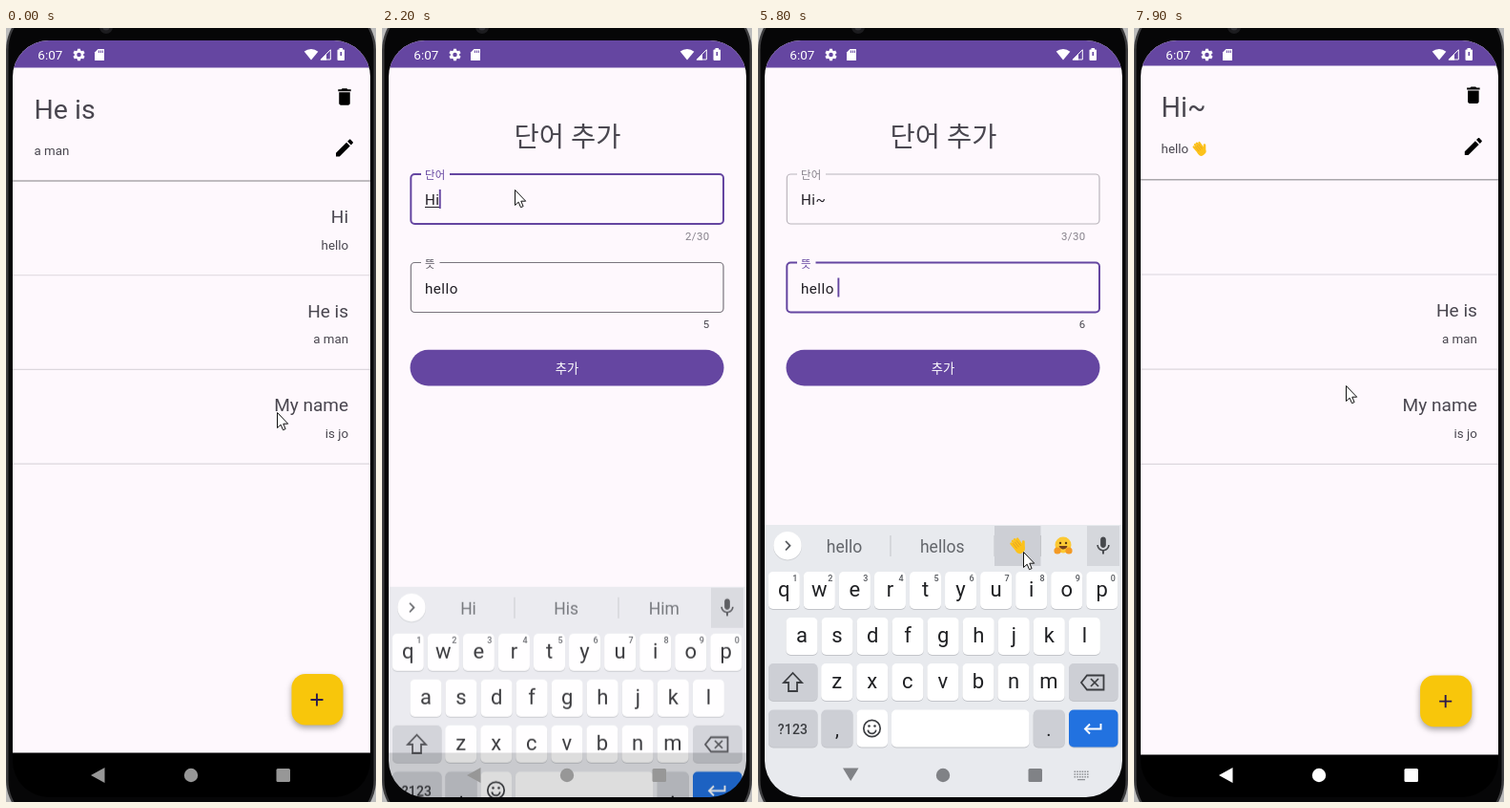
These frames come from a looping animation (388x810 px, 8 s). An HTML page with a canvas:

```html
<!DOCTYPE html>
<html lang="ko">
<head>
<meta charset="utf-8">
<title>단어 추가</title>
<style>
html, body { margin: 0; width: 388px; height: 810px; overflow: hidden; background: #000; }
canvas { display: block; }
</style>
</head>
<body>
<canvas id="stage" width="388" height="810"></canvas>
<script>
const LOOP = 8000;
const FONT = 'Roboto, "Noto Sans CJK KR", "Noto Sans CJK", sans-serif';
const PURPLE = '#6546a1', PAPER = '#fef8fd', INK = '#49464f', KEYS = '#e8eaee', SOFT = '#cdcfd5';

// Moments, in ms
const PICK = 600, OPEN = 1350, FOCUS1 = 2000, KEYS_IN = 2084, TILDE = 3100, FOCUS2 = 4400,
  SPACE = 4700, PRESS = 5600, WAVE = 6000, BACK = 6950, KEYS_OUT = 7200, ADD = 7520, CLOSE = 7650;

// Mouse path: time, x, y
const MOUSE = [
  [0, 284, 402], [450, 300, 230], [650, 300, 228], [1000, 349, 124], [1300, 349, 124],
  [1600, 226, 323], [1950, 139, 169], [2800, 139, 169], [3500, 150.500, 195], [3900, 150.500, 195],
  [4300, 150, 268], [4900, 152, 272], [5550, 278, 548], [6200, 278, 548], [6850, 88, 771],
  [7150, 88, 771], [7450, 206, 352], [7600, 206, 352], [7900, 222, 374], [8000, 226, 380]
];

const ICONS = {
  trash: 'M6 19c0 1.1.9 2 2 2h8c1.1 0 2-.9 2-2V7H6v12zM19 4h-3.500l-1-1h-5l-1 1H5v2h14V4z',
  pencil: 'M3 17.250V21h3.750L17.800 9.940l-3.750-3.750zM20.700 7.040c.4-.4.4-1 0-1.400l-2.340-2.340c-.4-.4-1-.4-1.400 0l-1.830 1.830 3.750 3.750z',
  mic: 'M12 14c1.700 0 3-1.300 3-3V5c0-1.700-1.300-3-3-3S9 3.300 9 5v6c0 1.700 1.300 3 3 3zm5.300-3c0 3-2.500 5.100-5.300 5.100S6.700 14 6.700 11H5c0 3.400 2.700 6.200 6 6.700V21h2v-3.300c3.300-.5 6-3.300 6-6.700z',
  arrow: 'M0 0V16L3.700 12.700 6 18.200 8.600 17.100 6.300 11.700H11.200Z'
};
for (const k in ICONS) ICONS[k] = new Path2D(ICONS[k]);

const screen = document.getElementById('stage').getContext('2d');
const layer = document.createElement('canvas');
layer.width = 388; layer.height = 810;
const keyLayer = layer.getContext('2d');
let c = screen;

const clamp = v => Math.min(1, Math.max(0, v));
const smooth = p => p * p * (3 - 2 * p);
// Fast start with a very long settling tail
const settle = p => p < 1 / 6 ? 14.4 * p * p : 1 - .6 * ((1 - p) * 1.2) ** 3;

function box(x, y, w, h, r, fill) {
  c.beginPath(); c.roundRect(x, y, w, h, r);
  c.fillStyle = fill; c.fill();
}
function dot(x, y, r, fill) {
  c.beginPath(); c.arc(x, y, r, 0, 7);
  c.fillStyle = fill; c.fill();
}
function line(color, width, ...pts) {
  c.beginPath();
  for (let i = 0; i < pts.length; i += 2) c.lineTo(pts[i], pts[i + 1]);
  c.strokeStyle = color; c.lineWidth = width; c.stroke();
}
function poly(fill, ...pts) {
  c.beginPath();
  for (let i = 0; i < pts.length; i += 2) c.lineTo(pts[i], pts[i + 1]);
  c.fillStyle = fill; c.fill();
}
function text(s, x, y, size, color = INK, align = 'left', gap = 0, weight = 400) {
  c.font = `${weight} ${size}px ${FONT}`;
  c.letterSpacing = gap + 'px';
  c.textAlign = align; c.fillStyle = color;
  c.fillText(s, x, y);
}
function icon(name, x, y, scale, color) {
  c.save();
  c.translate(x, y); c.scale(scale, scale); c.translate(-12, -12);
  c.fillStyle = color; c.fill(ICONS[name]);
  c.restore();
}
function gear(x, y, r, color, hole) {
  dot(x, y, r * .78, color);
  for (let i = 0; i < 6; i++) {
    c.save();
    c.translate(x, y); c.rotate(i * Math.PI / 3);
    box(-r * .25, -r, r * .5, r * .5, 0, color);
    c.restore();
  }
  dot(x, y, r * .36, hole);
}
function scaled(s, alpha, draw) {
  c.save();
  c.globalAlpha = alpha;
  c.translate(194.5, 400); c.scale(s, s); c.translate(-194.5, -400);
  draw();
  c.restore();
}

function wave(x, y, size) {
  c.save();
  c.translate(x, y); c.scale(size / 14, size / 14); c.rotate(-.65);
  c.lineCap = 'round';
  [-3, -1, 1, 3].forEach((fx, i) => line('#fcc21b', 2.2, fx, 1, fx * 1.1, -6.500 + Math.abs(i - 1.5)));
  line('#fcc21b', 2.4, 3, 4, 6, 0);
  box(-4.200, -1, 8.400, 8, 3.500, '#fcc21b');
  [-2, 0, 2].forEach(fx => line('#e39a1c', .6, fx, 1, fx, -4));
  c.restore();
}
function hugFace(x, y) {
  dot(x, y - 1, 8.500, '#fcc934');
  dot(x - 3, y - 3, 1.2, '#5b3a12');
  dot(x + 3, y - 3, 1.2, '#5b3a12');
  c.beginPath(); c.arc(x, y - 1, 4.5, .2, 2.940); c.fillStyle = '#74401b'; c.fill();
  dot(x - 6, y + 5, 3.600, '#f39a25');
  dot(x + 6, y + 5, 3.600, '#f39a25');
}

function windowBase() {
  box(7, 13, 375, 792, 0, '#000');
  box(7, 13, 375, 745.500, 0, PAPER);
  box(7, 13, 375, 28.500, 0, PURPLE);
}

function listPage(t) {
  windowBase();
  const done = t >= CLOSE;
  const [word, meaning] = done ? ['Hi~', 'hello'] : t < PICK ? ['He is', 'a man'] : ['Hi', 'hello'];
  text(word, 29.500, 95, 28.500);
  text(meaning, 29.500, 132.500, 13.300);
  if (done) wave(69.500, 128, 15);
  icon('trash', 355, 72, .96, '#000');
  icon('pencil', 355, 125.500, 1, '#000');
  line('#aaa7ab', 1.4, 7, 160, 382, 160);
  [['Hi', 'hello'], ['He is', 'a man'], ['My name', 'is jo']].forEach(([a, b], i) => {
    const y = 160 + i * 98.700;
    if (i || !done) {
      text(a, 359, y + 44, 19, INK, 'right');
      text(b, 359, y + 71.500, 13.300, INK, 'right');
    }
    line('#dcd7dd', 1.1, 7, y + 98.700, 382, y + 98.700);
  });
  c.save();
  c.shadowColor = 'rgba(0,0,0,.35)'; c.shadowBlur = 6; c.shadowOffsetY = 3;
  box(299.500, 676, 54, 53.500, 14.5, '#f8c60b');
  c.restore();
  line('#2c1a4d', 1.9, 319.500, 703, 332.500, 703);
  line('#2c1a4d', 1.9, 326, 696.500, 326, 709.500);
}

function field(y, label, gapEnd, value, count, focused, quiet, mark) {
  const edge = focused ? PURPLE : quiet ? '#bab5bc' : '#79757d';
  const tone = focused ? PURPLE : quiet ? '#858089' : '#5a5660';
  c.beginPath(); c.roundRect(30.300, y, 327.700, 52, 4);
  c.strokeStyle = edge; c.lineWidth = focused ? 2 : 1.2; c.stroke();
  box(41, y - 3, gapEnd - 41, 6, 0, PAPER);
  text(label, 45, y + 5, 11.400, tone, 'left', .3);
  text(value, 45, y + 32, 15.200, '#201d24', 'left', .475);
  const end = 45 + c.measureText(value).width;
  if (mark) line('#201d24', 1, 45, y + 34.500, end, y + 34.500);
  text(count, 343.500, y + 68.700, 11.400, quiet ? '#85808a' : INK, 'right', .4);
  return end;
}

function formPage(t) {
  windowBase();
  const focus = t < FOCUS1 ? 0 : t < FOCUS2 ? 1 : 2;
  text('단어 추가', 194.500, 124.300, 28.500, INK, 'center');
  const first = t < TILDE ? 'Hi' : 'Hi~';
  const second = t < SPACE ? 'hello' : 'hello ';
  const count = t < SPACE ? 5 : t < WAVE ? 6 : 8;
  const ends = [
    field(153, '단어', 71, first, first.length + '/30', focus === 1, true, focus === 1 && t < TILDE),
    field(245.500, '뜻', 60.500, second, String(count), focus === 2, false, focus === 2 && t < SPACE)
  ];
  if (t >= WAVE) {
    wave(94, 273, 16.500);
    ends[1] += 19.500;
  }
  const lastEdit = [FOCUS1, TILDE, FOCUS2, SPACE, WAVE].filter(m => m <= t).pop();
  if (focus && (t - lastEdit) % 1000 < 500) {
    const y = focus === 1 ? 169 : 261.500;
    line(PURPLE, 1.9, ends[focus - 1] + .3, y, ends[focus - 1] + .3, y + 20);
  }
  box(29.500, 336.700, 329, 37.800, 18.900, t >= ADD && t < CLOSE ? '#7558ab' : PURPLE);
  text('추가', 194, 360.500, 13.300, '#fff', 'center', .1, 500);
}

function key(x, y, w, fill = '#fff') {
  box(x, y + 1, w, 39, 5, '#c3c5ca');
  box(x, y, w, 39, 5, fill);
}

function suggestionBar(t) {
  const grey = '#5b5e63';
  box(345, 521, 34, 42, 0, '#d5d7dc');
  icon('mic', 362, 542, .95, '#46484c');
  dot(31, 542.500, 15, '#cfd1d5');
  dot(31, 541.700, 14.700, '#fff');
  const tools = t >= TILDE && t < FOCUS2;
  const d = tools ? -1 : 1;
  line('#55585c', 1.8, 31 - 2 * d, 537, 31 + 2.5 * d, 541.700, 31 - 2 * d, 546.500);
  const divider = x => line('#c3c5c9', 1, x, 531, x, 553);
  if (tools) {
    c.strokeStyle = grey; c.lineWidth = 1.8;
    c.beginPath(); c.roundRect(72.500, 534.500, 15, 15, [2, 2, 7, 2]); c.stroke();
    c.beginPath(); c.arc(80, 542, 3.500, .2, 2.900); c.stroke();
    dot(77.500, 540, 1.1, grey); dot(82.500, 540, 1.1, grey);
    text('GIF', 133.200, 546.500, 13.700, grey, 'center', .6, 900);
    c.beginPath(); c.roundRect(181, 535, 13.500, 15, 1.5); c.stroke();
    box(184.500, 533, 6.500, 4.500, 1, grey);
    [541, 544, 547].forEach(y => line(grey, 1.2, 184, y, 191.500, y));
    gear(242, 542, 9, grey, KEYS);
    divider(275);
    [302, 308.500, 315].forEach(x => dot(x, 542, 2, grey));
  } else if (t < WAVE) {
    const early = t < TILDE;
    const words = early ? ['Hi', 'His', 'Him'] : ['hello', 'hellos'];
    words.forEach((w, i) => text(w, 90.500 + i * 102.700, 548.500, 17.500, '#63666b', 'center'));
    divider(139); divider(248);
    if (!early) {
      if (t >= PRESS) box(248, 521, 48.500, 42, 0, SOFT);
      divider(296.500);
      wave(272.500, 542, 17);
      hugFace(320, 542);
    }
  }
}

function navBack(color, down) {
  if (down) poly(color, 89, 774.500, 105.500, 774.500, 97.200, 788);
  else poly(color, 89, 782, 103.500, 774, 103.500, 790);
}
function navRest(color) {
  dot(194, 782, 7.200, color);
  box(283.500, 775, 14.5, 14, 1.5, color);
}

function keyboard(t) {
  const ink = '#1f2023';
  box(0, 520, 388, 290, 0, KEYS);
  suggestionBar(t);
  ['qwertyuiop', 'asdfghjkl', 'zxcvbnm'].forEach((row, r) => {
    const x0 = [27.300, 46, 82.700][r], y = 569 + 48 * r;
    [...row].forEach((ch, i) => {
      const x = x0 + 37.050 * i;
      key(x - 16.500, y, 33);
      text(ch, x, y + 26, 22, ink, 'center');
      if (!r) text((i + 1) % 10, x + 11.500, y + 10, 9, '#55585d', 'center', 0, 500);
    });
  });
  key(11, 665, 51.500, SOFT); key(326, 665, 51.500, SOFT);
  line('#3c3e42', 1.8, 36.500, 675, 27, 685, 32, 685, 32, 694, 41, 694, 41, 685, 46, 685, 36.500, 675, 27, 685);
  line('#3c3e42', 1.8, 339, 685, 345, 677.500, 362.500, 677.500, 362.500, 692.500, 345, 692.500, 339, 685, 345, 677.500);
  line('#3c3e42', 1.7, 349, 681, 357, 689);
  line('#3c3e42', 1.7, 357, 681, 349, 689);

  key(11, 713.500, 51.500, SOFT); key(66.500, 713.500, 33, SOFT);
  key(103.500, 713.500, 32.500); key(140, 713.500, 144.500);
  key(288.700, 713.500, 33, SOFT); key(326, 713.500, 51.500, '#2272e0');
  text('?123', 36.500, 738.500, 14, '#3c3e42', 'center', .2, 500);
  text(',', 83, 741, 20, ink, 'center');
  text('.', 305, 741, 20, ink, 'center');
  c.beginPath(); c.arc(119.500, 733, 8.700, 0, 7);
  c.strokeStyle = '#3c3e42'; c.lineWidth = 1.7; c.stroke();
  dot(116.500, 730.500, 1.3, '#3c3e42'); dot(122.500, 730.500, 1.3, '#3c3e42');
  c.beginPath(); c.arc(119.500, 734, 4.300, .15, 3); c.stroke();
  line('#fff', 1.9, 359.500, 728, 359.500, 733.500, 343.500, 733.500);
  line('#fff', 1.9, 348, 728.500, 343, 733.500, 348, 738.500);
}

function keyboardLayer(t) {
  if (t < KEYS_IN || t >= KEYS_OUT + 220) return;
  const shown = t < KEYS_OUT
    ? 1 - (1 - clamp((t - KEYS_IN) / 300)) ** 3
    : 1 - clamp((t - KEYS_OUT) / 220) ** 2;
  c = keyLayer;
  c.clearRect(0, 0, 388, 810);
  keyboard(t);
  c = screen;
  c.globalAlpha = clamp(shown * 1.12);
  c.drawImage(layer, 0, 285 * (1 - shown));
  c.globalAlpha = 1;
}

function navBar(t) {
  const typing = t >= KEYS_IN + 200 && t < KEYS_OUT + 60;
  const color = typing ? '#808286' : t >= CLOSE ? '#fff' : '#979797';
  if (t >= BACK && t < KEYS_OUT + 50) dot(97, 781.500, 23.700, '#d2d3d8');
  navBack(color, typing);
  navRest(color);
  if (!typing) return;
  for (let y = 0; y < 3; y++)
    for (let x = 0; x < 6; x++) box(331.500 + x * 2.700, 777.500 + y * 2.700, 1.6, 1.6, 0, '#909296');
  box(335, 786, 8, 1.3, 0, '#909296');
}

function statusBar() {
  const w = '#fff';
  text('6:07', 33.300, 32.800, 13.500, w);
  gear(76.500, 28, 6.200, w, PURPLE);
  poly(w, 96.500, 22, 103, 22, 103, 34, 93, 34, 93, 25.500);
  [96.800, 98.800, 100.800].forEach(x => box(x, 23.500, 1, 2.500, 0, PURPLE));
  c.beginPath(); c.moveTo(320, 33.500); c.arc(320, 33.500, 11.500, -2.260, -.88); c.fillStyle = w; c.fill();
  line(w, 1, 330, 33, 340.300, 33, 340.300, 22.800, 330, 33);
  poly(w, 329.500, 33.500, 336, 33.500, 336, 27);
  box(347.500, 22.500, 7.500, 11.500, 1, w);
  box(349.500, 21, 3.500, 2, 0, w);
  box(350.500, 25, 1.6, 4, 0, PURPLE);
}

function phoneBody() {
  box(0, 0, 388, 810, 0, '#bbb');
  box(0, -25, 388, 860, 48, '#3a3a3c');
  box(2.500, -24, 383, 858, 47, '#060607');
  dot(105, -1, 7, '#1c1c1f');
  dot(105, -1, 3.500, '#333338');
}

function mouse(t) {
  let i = 1;
  while (i < MOUSE.length - 1 && MOUSE[i][0] < t) i++;
  const [t0, x0, y0] = MOUSE[i - 1], [t1, x1, y1] = MOUSE[i];
  const p = smooth(clamp((t - t0) / (t1 - t0)));
  c.save();
  c.translate(x0 + (x1 - x0) * p + .5, y0 + (y1 - y0) * p + .5);
  c.fillStyle = '#fff'; c.fill(ICONS.arrow);
  c.strokeStyle = '#111'; c.lineWidth = 1; c.stroke(ICONS.arrow);
  c.restore();
}

function pages(t) {
  if (t < OPEN) return listPage(t);
  if (t < CLOSE) {
    const p = clamp((t - OPEN) / 400), e = settle(p);
    if (p < 1) scaled(1 + .15 * e, 1, () => listPage(t));
    return scaled(.85 + .15 * e, clamp((t - OPEN - 35) / 50), () => formPage(t));
  }
  const e = settle(clamp((t - CLOSE) / 400));
  scaled(1.1 - .1 * e, 1, () => listPage(t));
  const fade = 1 - clamp((t - CLOSE - 35) / 50);
  if (fade) scaled(1 - .1 * e, fade, () => formPage(t));
}

function draw(t) {
  phoneBody();
  c.save();
  c.beginPath(); c.roundRect(7, 13, 375, 792, 38); c.clip();
  pages(t);
  keyboardLayer(t);
  navBar(t);
  statusBar();
  c.restore();
  mouse(t);
}

const start = performance.now();
function tick() {
  draw((performance.now() - start) % LOOP);
  requestAnimationFrame(tick);
}
tick();
</script>
</body>
</html>
```
